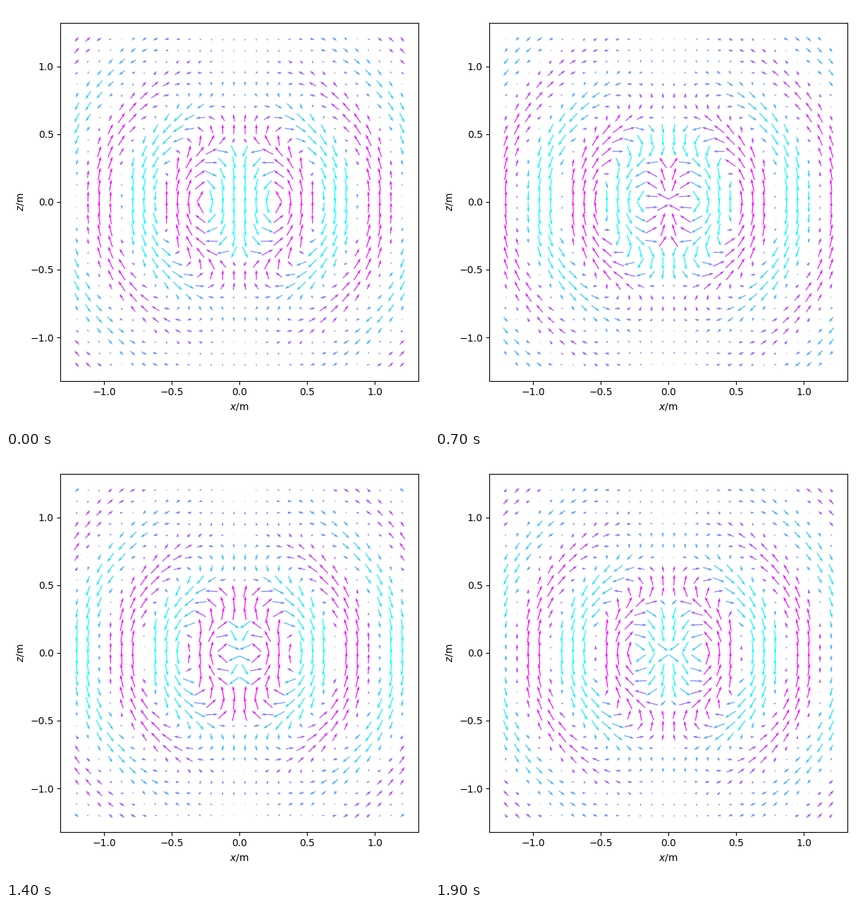
A matplotlib script for the animation above (2 s loop, 600 by 600 pixels).

```python
import numpy as np
import matplotlib.pyplot as plt
from matplotlib.animation import FuncAnimation

FRAMES = 20
INTERVAL = 100
WAVELENGTH = 0.6
K = 2 * np.pi / WAVELENGTH
LIMIT = 0.073       # field strength at which arrows stop growing
ARROW_SCALE = 28    # arrow units per axes width

axis = np.linspace(-1.2, 1.2, 30)
X, Z = np.meshgrid(axis, axis)
R = np.hypot(X, Z)
SIN, COS = X / R, Z / R

# Complex amplitudes of an oscillating point dipole along z
rho = K * R
wave = np.exp(1j * rho)
near = 1 / rho**3 - 1j / rho**2
E_r = 2 * COS * near * wave
E_t = SIN * (near - 1 / rho) * wave
E_x = E_r * SIN + E_t * COS
E_z = E_r * COS - E_t * SIN


def field(i):
    """Clipped field components at frame i."""
    turn = np.exp(-2j * np.pi * i / FRAMES)
    u, v = -(E_x * turn).imag, -(E_z * turn).imag
    size = np.maximum(np.hypot(u, v), LIMIT)
    return u / size, v / size


fig, ax = plt.subplots(figsize=(6, 6), dpi=100)
u, v = field(0)
arrows = ax.quiver(X, Z, u, v, v, cmap="cool", clim=(-1, 1),
                   pivot="mid", scale=ARROW_SCALE, width=0.0024)
ax.set_aspect("equal")
ax.set_xlabel("$x$/m")
ax.set_ylabel("$z$/m")
fig.tight_layout()


def update(i):
    u, v = field(i)
    arrows.set_UVC(u, v, v)
    return (arrows,)


anim = FuncAnimation(fig, update, frames=FRAMES, interval=INTERVAL, repeat=True)
plt.show()
```
